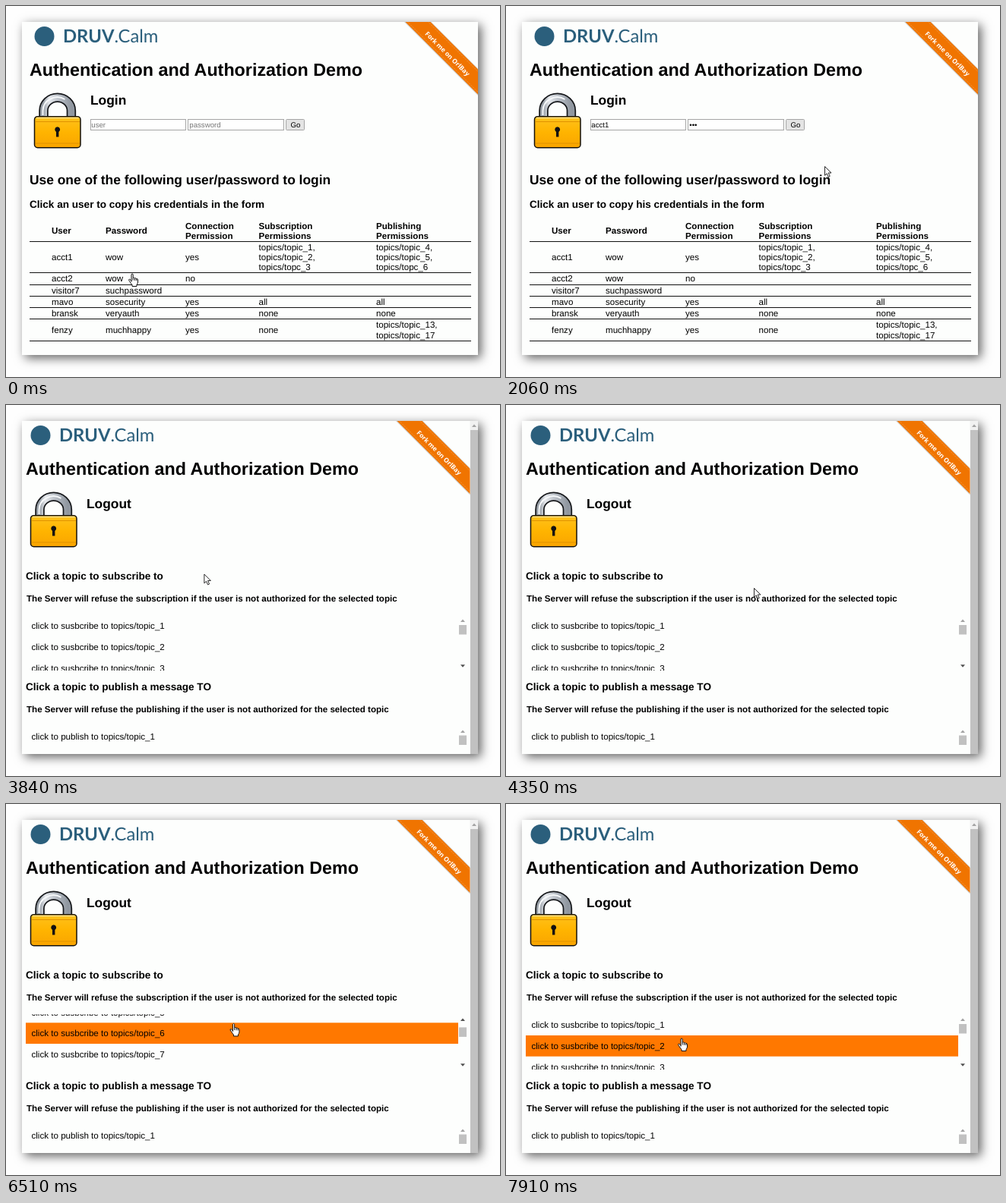
Write an HTML page that moves like this. It is 650 px wide and 489 px high and loops after 8000 ms.

```html
<!DOCTYPE html>
<html lang="en">
<head>
<meta charset="utf-8">
<title>Authentication and Authorization Demo</title>
<style>
  html, body { margin: 0; width: 100%; height: 100%; overflow: hidden; background: #fefefe; }
  #panel { position: absolute; left: 21px; top: 21px; width: 600px; height: 439px;
    background: #fdfefd; box-shadow: 4px 4px 13px rgba(0, 0, 0, .62); }
  svg { display: block; }
  text { font: 11.6px "Liberation Sans", Arial, sans-serif; text-rendering: geometricPrecision; white-space: pre; }
  .h1, .h2, .h3, .h4 { font-weight: bold; }
  .h1 { font-size: 23.3px; }
  .h2 { font-size: 17.4px; }
  .h3 { font-size: 13.57px; }
  .form text { font-size: 9.67px; }
  .hint { fill: #777; }
  .brand { font: 23.8px Lato, sans-serif; fill: #2b5f7c; }
  .ribbon { font: bold 8.5px "Open Sans", sans-serif; fill: #fff; }
  .rule { stroke: #111; }
  .thumb { fill: #c1c1c1; }
</style>
</head>
<body>
<div id="panel">
<svg width="600" height="439" viewBox="21 21 600 439">
  <defs>
    <linearGradient id="gold" x2="0" y2="1">
      <stop stop-color="#ffc21c"/><stop offset=".5" stop-color="#ffb400"/><stop offset="1" stop-color="#f9a400"/>
    </linearGradient>
    <linearGradient id="steel">
      <stop stop-color="#9aa1a9"/><stop offset=".2" stop-color="#e6e9ed"/>
      <stop offset=".6" stop-color="#b4bac2"/><stop offset="1" stop-color="#9097a0"/>
    </linearGradient>
    <clipPath id="listClip"><rect x="26" y="277.3" width="569" height="72.7"/></clipPath>
  </defs>

  <g id="head">
    <circle cx="50.5" cy="40" r="13" fill="#2b5f7c"/>
    <text class="brand" x="75" y="48"><tspan font-weight="bold">DRUV</tspan>.Calm</text>
    <text class="h1" x="31" y="92">Authentication and Authorization Demo</text>
    <g fill="none">
      <path d="M49.500 148V138a18.200 17.300 0 0 1 36.400 0V148" stroke="#15171a" stroke-width="12.500"/>
      <path d="M49.500 148V138a18.200 17.300 0 0 1 36.400 0V148" stroke="url(#steel)" stroke-width="9"/>
      <path d="M48.500 144V138a19 18 0 0 1 29 -15" stroke="#f6f8fa" stroke-width="2"/>
    </g>
    <rect x="37.500" y="145.700" width="60.500" height="41" rx="4" fill="url(#gold)" stroke="#15110a" stroke-width="1.500"/>
    <path d="M40 147.500H95.500" stroke="#ffe28a" stroke-width="1.500"/>
    <path d="M39 152.500H97M39 181H97" stroke="#e09200"/>
    <path d="M67.700 159.300a3.600 3.600 0 0 1 1.700 6.700V172.500h-3.400v-6.500a3.600 3.600 0 0 1 1.700 -6.700Z" fill="#111"/>
  </g>

  <g id="ribbon">
    <path d="M523 20L622 119V83.500L558.500 20Z" fill="#777" opacity=".35"/>
    <path d="M524.500 20L622 117.500V84.500L557.500 20Z" fill="#f07400"/>
    <path d="M527.500 20L622 114.500M554.500 20L622 87.500" stroke="#ffd9b0" stroke-width=".6" stroke-dasharray="2 1.500" opacity=".6"/>
    <text class="ribbon" text-anchor="middle" transform="translate(578.700 65) rotate(45)">Fork me on OrlBay</text>
  </g>

  <g id="login">
    <text class="h2" x="111" y="130">Login</text>
    <g class="form">
      <g fill="#fff" stroke="#a5a5a5">
        <rect x="111.500" y="149.500" width="125" height="14"/>
        <rect x="239.500" y="149.500" width="126" height="14"/>
        <rect id="go" x="368.500" y="149.500" width="24" height="14" rx="1"/>
      </g>
      <text id="user" x="112.300" y="160"></text>
      <text id="pass" x="241.300" y="160"></text>
      <text x="374.400" y="160">Go</text>
    </g>
  </g>

  <g id="connect">
    <text class="h2" x="111" y="136">Logout</text>
    <g id="offer">
      <text class="h3" x="31" y="230">Click to connect to the target MQTT Broker</text>
      <text class="h4" x="31" y="259">The Server will refuse the connection if the user is not authorized for target MQTT broker</text>
    </g>
  </g>

  <g id="accounts">
    <g id="intro">
      <text class="h2" x="31" y="235">Use one of the following user/password to login</text>
      <text class="h3" x="31" y="266">Click an user to copy his credentials in the form</text>
    </g>
    <g id="table"></g>
  </g>

  <g id="topics">
    <text class="h2" x="106" y="136">Logout</text>
    <text class="h3" x="26" y="230">Click a topic to subscribe to</text>
    <text class="h4" x="27" y="259">The Server will refuse the subscription if the user is not authorized for the selected topic</text>
    <g clip-path="url(#listClip)"><g id="list"></g></g>
    <path id="up" d="M598 286l3 -3.500l3 3.500Z"/>
    <rect id="thumb" class="thumb" x="596" width="10" height="12.500"/>
    <path d="M598 342.300l3 3.500l3 -3.500Z" fill="#505050"/>
    <text class="h3" x="26" y="376">Click a topic to publish a message TO</text>
    <text class="h4" x="27" y="405">The Server will refuse the publishing if the user is not authorized for the selected topic</text>
    <text x="33.500" y="441">click to publish to topics/topic_1</text>
    <path d="M598 432l3 -3.500l3 3.500Z" fill="#a3a3a3"/>
    <rect class="thumb" x="596" y="435.500" width="10" height="12.500"/>
    <rect x="610.500" y="21" width="10.500" height="439" fill="#f1f1f1"/>
    <path d="M613 29l3 -3.500l3 3.500Z" fill="#a3a3a3"/>
    <rect class="thumb" x="611" y="33" width="10" height="427"/>
  </g>

  <g id="cursor" fill="#fff" stroke="#111" stroke-linejoin="round">
    <path id="arrow" d="M.5 .5V12.300L3.200 9.800L5.200 14.300L7.200 13.400L5.200 9H9Z" stroke-width=".9"/>
    <path id="hand" transform="translate(-4 0)" d="M4 11.500V1.700Q5 .1 6.200 1.700V6.300Q7.700 5.400 8.500 6.800Q10 6.200 10.700 7.500Q12.400 7.200 12.500 9V12Q12.400 14 11 15.500V17.500H5V15.600Q3.500 14 2.300 11.900L.7 9.600Q.3 8.100 1.700 8.200Q3 8.700 4 10.600M6.200 6.300V9.500M8.500 6.800V9.800M10.700 7.500V10"/>
  </g>
</svg>
</div>
<script>
const LOOP = 8000, ROW = 27.7, LIST_TOP = 277.3, LINE = 13.2;
const $ = id => document.getElementById(id);
const text = (s, x, y, cls = '') => `<text class="${cls}" x="${x}" y="${y}">${s}</text>`;

// Account table: middle of the row, rule below it, then the cells; "|" breaks a line.
const columns = [60, 131, 236, 332.5, 487];
const rows = [
  [296.3, 310.5, 'User', 'Password', 'Connection|Permission', 'Subscription|Permissions', 'Publishing|Permissions'],
  [331, 351.5, 'acct1', 'wow', 'yes', 'topics/topic_1,|topics/topic_2,|topics/topc_3', 'topics/topic_4,|topics/topic_5,|topics/topc_6'],
  [359, 367.5, 'acct2', 'wow', 'no'],
  [374.5, 382.5, 'visitor7', 'suchpassword'],
  [390, 397.5, 'mavo', 'sosecurity', 'yes', 'all', 'all'],
  [405, 412.5, 'bransk', 'veryauth', 'yes', 'none', 'none'],
  [427, 441.5, 'fenzy', 'muchhappy', 'yes', 'none', 'topics/topic_13,|topics/topic_17']
];
$('table').innerHTML = rows.map(([mid, line, ...cells], r) =>
  cells.map((cell, c) => cell.split('|').map((s, i, all) =>
    text(s, columns[c], mid + 4 + LINE * (i - (all.length - 1) / 2), r ? '' : 'h4')).join('')).join('') +
  `<path class="rule" d="M31 ${line}H612"/>`).join('');

$('list').innerHTML = Array.from({ length: 10 }, (_, i) => {
  const y = LIST_TOP + ROW * i;
  return `<rect x="26" y="${y}" width="569" height="${ROW}"/>` + text(`click to susbcribe to topics/topic_${i + 1}`, 33.5, y + 17.9);
}).join('');
const bars = document.querySelectorAll('#list rect'), labels = document.querySelectorAll('#list text');
const offered = labels[3].textContent;

// Tracks hold [time, value...]; "glide" eases between keys, "held" jumps.
const pointer = [[0, 165, 352], [100, 165, 352], [650, 166, 346], [820, 166, 346], [1350, 418, 196],
  [1590, 383, 157], [1660, 383, 157], [2060, 419, 211], [2640, 419, 211], [2840, 353, 223], [3070, 237, 216],
  [3299, 237, 216], [3300, 242, 216], [3449, 242, 216], [3450, 237, 216], [3700, 237, 216], [4120, 326, 241],
  [4350, 326, 241], [4730, 262, 290], [4860, 262, 290], [5190, 254, 293], [5420, 256, 300], [5660, 257, 301],
  [5900, 257, 301], [6590, 300, 288], [6740, 300, 288], [7140, 348, 325], [7500, 348, 325], [7910, 230, 308]];
const scrolling = [[0, 0], [4560, 0], [4730, 73], [6350, 73], [6590, 146], [6800, 146], [7000, 73], [7540, 73], [7740, 0]];
const hovering = [[0, -1], [4480, 0], [4880, 3], [6500, 5], [7780, 1]];
const shape = [[0, 'hand'], [900, 'arrow'], [2740, 'hand'], [3760, 'arrow'], [4480, 'hand']];

const held = (track, t) => track.findLast(k => k[0] <= t)[1];
function glide(track, t) {
  const i = track.findLastIndex(k => k[0] <= t), a = track[i], b = track[i + 1] || a;
  const p = a === b ? 0 : (t - a[0]) / (b[0] - a[0]), e = p * p * (3 - 2 * p);
  return a.slice(1).map((v, n) => v + (b[n + 1] - v) * e);
}
const show = (id, on) => $(id).style.display = on ? '' : 'none';
const move = (id, x, y) => $(id).setAttribute('transform', `translate(${x} ${y})`);
const fill = (el, color) => el.setAttribute('fill', color);

function draw(t) {
  const login = t < 2210, topics = t >= 3760, filled = t >= 400, denied = t >= 6000;
  show('login', login);
  show('connect', !login && !topics);
  show('accounts', !topics);
  show('topics', topics);
  move('head', topics ? -5 : 0, 0);
  move('ribbon', topics ? -11 : 0, 0);
  move('intro', 0, login ? 0 : 59);
  move('table', 0, login ? 0 : 60);

  $('user').textContent = filled ? 'acct1' : 'user';
  $('pass').textContent = filled ? '•••' : 'password';
  for (const id of ['user', 'pass']) $(id).setAttribute('class', filled ? '' : 'hint');
  fill($('go'), t > 1540 && t < 1740 ? '#d2d6dc' : '#e4e4e4');
  fill($('offer'), t >= 2740 ? '#ff7800' : '#000');

  const [scroll] = glide(scrolling, t), hover = held(hovering, t);
  move('list', 0, -scroll);
  bars.forEach((bar, i) => fill(bar, denied && i === 3 ? '#f00' : i === hover ? '#ff7800' : 'none'));
  labels[3].textContent = denied ? "Unauthorized access: user 'acct1' can't receive messages from 'topics/topic_4'" : offered;
  $('thumb').setAttribute('y', 290 + scroll / 29);
  fill($('up'), scroll > 0 ? '#505050' : '#a3a3a3');

  move('cursor', ...glide(pointer, t));
  for (const id of ['arrow', 'hand']) show(id, id === held(shape, t));
}

const start = performance.now();
function tick() {
  draw((performance.now() - start) % LOOP);
  requestAnimationFrame(tick);
}
tick();
</script>
</body>
</html>
```
